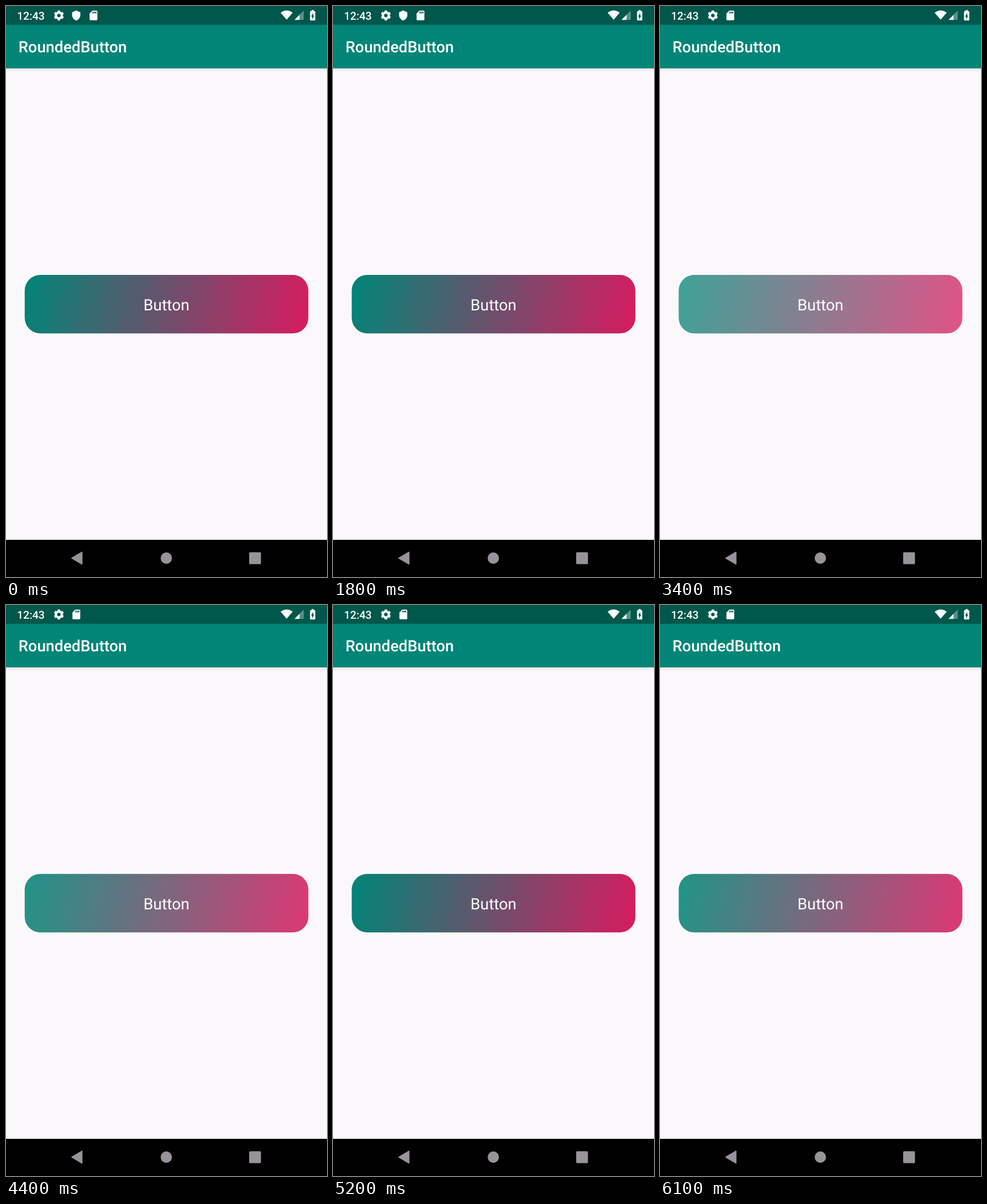
An HTML page that plays this animation: 561 px wide and 998 px high, repeating every 8000 ms.

```html
<!DOCTYPE html>
<html lang="en">
<head>
<meta charset="utf-8">
<title>Rounded button</title>
<style>
  html, body { margin: 0; width: 100%; height: 100%; overflow: hidden; background: #faf8fb; }
  svg { display: block; width: 561px; height: 998px; }
  text { font-family: Roboto, sans-serif; fill: #fff; text-rendering: geometricPrecision; }
  .medium { font-weight: 500; }
  .icons { fill: #fff; }
  .nav { fill: #98939a; }
</style>
</head>
<body>
<svg viewBox="0 0 561 998">
  <defs>
    <linearGradient id="fill" gradientUnits="userSpaceOnUse" x1="32.7" y1="470" x2="528.4" y2="572">
      <stop stop-color="#008577"/>
      <stop offset="1" stop-color="#d81b60"/>
    </linearGradient>
    <linearGradient id="shadow" x2="0" y2="1">
      <stop stop-color="#000" stop-opacity=".1"/>
      <stop offset=".4" stop-color="#000" stop-opacity=".04"/>
      <stop offset="1" stop-color="#000" stop-opacity="0"/>
    </linearGradient>
    <clipPath id="shape">
      <rect id="outline" x="32.7" y="470" width="495.7" height="102.3" rx="27.3"/>
    </clipPath>
  </defs>

  <rect width="561" height="998" fill="#faf8fb"/>
  <rect y="109" width="561" height="7" fill="url(#shadow)"/>
  <rect y="32" width="561" height="77" fill="#008577"/>
  <rect width="561" height="32.8" fill="#00574b"/>

  <text class="medium" x="19.2" y="23.8" font-size="19.1">12:43</text>
  <text class="medium" x="21.8" y="81.4" font-size="27.3">RoundedButton</text>

  <g class="icons">
    <g fill="none" stroke="#fff">
      <circle cx="92.4" cy="16.5" r="5.1" stroke-width="4"/>
      <circle cx="92.4" cy="16.5" r="7.6" stroke-width="2.4" pathLength="12"
              stroke-dasharray="1.1 .9" stroke-dashoffset="-.45"/>
    </g>
    <path id="shield" transform="translate(113.1 7)"
          d="M9.6.8 2.4 4v4.8c0 4.4 3.1 8.6 7.2 9.6 4.1-1 7.2-5.2 7.2-9.6V4z"/>
    <g id="card">
      <path transform="translate(142.7 6.3) scale(.85)"
            d="M18 2h-8L4 8v12c0 1.1.9 2 2 2h12c1.1 0 2-.9 2-2V4c0-1.1-.9-2-2-2zm-6 6h-2V4h2zm3 0h-2V4h2zm3 0h-2V4h2z"/>
    </g>
    <path d="M490.5 24 480 11.8q10.5-8 21 0z"/>
    <path d="M520.3 8v16.2h-16z" opacity=".35"/>
    <path d="M513 15.4v8.8h-8.7z"/>
    <path transform="translate(525 5.3) scale(.91)"
          d="M15.7 4H14V2h-4v2H8.3Q7 4 7 5.3v15.4Q7 22 8.3 22h7.4q1.3 0 1.3-1.3V5.3Q17 4 15.7 4zM11 20v-5.5H9L13 7v5.5h2z"/>
  </g>

  <use href="#outline" fill="url(#fill)"/>
  <g clip-path="url(#shape)">
    <circle id="ripple" cx="280.5" cy="521.2" r="0" fill="#fff"/>
  </g>
  <text x="280.5" y="531.6" font-size="27.3" text-anchor="middle">Button</text>

  <rect y="933" width="561" height="65"/>
  <g class="nav">
    <path d="M114.6 964.2 132 954q1.6-.8 1.6 1v20q0 1.8-1.6 1l-17.4-10.2q-1.2-.8 0-1.6z"/>
    <circle cx="280.2" cy="965" r="9.9"/>
    <rect x="425" y="954.8" width="20.6" height="20.6" rx="1.6"/>
  </g>
</svg>
<script>
  const LOOP = 8000, STEP = 100, DISMISS = 2700;
  const PEAK = .5, ENTER = 225, FADE_IN = 75, FADE_OUT = 150;
  const START_RADIUS = 149, FULL_RADIUS = 254;

  // Press time, release time, tint that lingers until the next press
  const taps = [
    [30, 255, 0], [480, 705, 0], [930, 1155, 0], [1380, 1605, 0],
    [2230, 2550, 0], [3030, 3323, 0], [3960, 4288, .125],
    [4650, 4820, 0], [4950, 5045, 0], [5250, 5475, 0], [5680, 5988, .125]
  ];

  const [ripple, shield, card] = ['ripple', 'shield', 'card'].map(id => document.getElementById(id));
  const clamp = v => Math.min(1, Math.max(0, v));

  function drawRipple(t) {
    const [press, release, rest] = taps.findLast(tap => tap[0] <= t) || [t, t, 0];
    const spread = 1 - 400 ** (-1.4 * clamp((t - press) / ENTER));
    const fadeIn = clamp((t - press) / FADE_IN);
    const fadeOut = 1 - clamp((t - release) / FADE_OUT);
    ripple.setAttribute('r', START_RADIUS + (FULL_RADIUS - START_RADIUS) * spread);
    ripple.setAttribute('opacity', Math.max(rest * fadeIn, PEAK * fadeIn * fadeOut));
  }

  function draw(now) {
    const t = Math.floor(now % LOOP / STEP) * STEP;
    const dismissed = t >= DISMISS;
    drawRipple(t);
    shield.setAttribute('opacity', dismissed ? 0 : 1);
    card.setAttribute('transform', `translate(${dismissed ? -30 : 0} 0)`);
  }

  const start = performance.now();
  function tick() {
    draw(performance.now() - start);
    requestAnimationFrame(tick);
  }
  tick();
</script>
</body>
</html>
```
